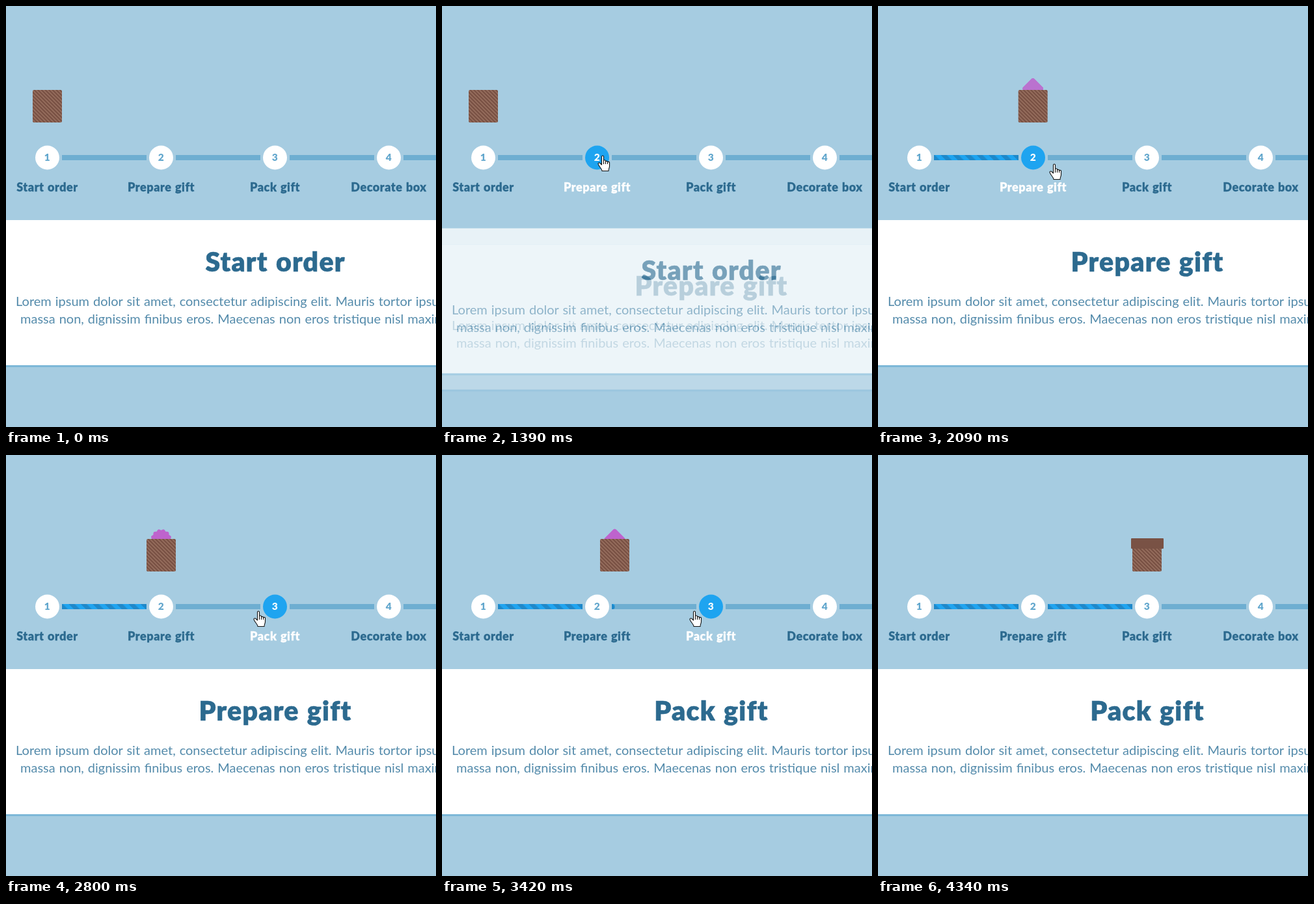
Write an HTML page that moves like this. It is 661 by 647 pixels and loops after 4.89 s.

```html
<!DOCTYPE html>
<html lang="en">
<head>
<meta charset="utf-8">
<title>Gift order steps</title>
<style>
  html, body { margin: 0; width: 100%; height: 100%; overflow: hidden; background: #a6cce1; }
  svg { display: block; width: 661px; height: 647px; }
  text { font-family: Lato, Roboto, sans-serif; }
  .bold { font-weight: 900; text-anchor: middle; letter-spacing: .03em; word-spacing: .04em; stroke-width: .015em; }
  .title { font-size: 41px; fill: #2c6a8f; stroke: #2c6a8f; }
  .label { font-size: 18px; }
  .num { font-size: 15.5px; }
  .body { font-size: 20px; fill: #548bab; word-spacing: .87px; }
</style>
</head>
<body>
<svg viewBox="0 0 661 647">
  <defs>
    <pattern id="wood" width="4" height="4" patternUnits="userSpaceOnUse" patternTransform="rotate(45)">
      <rect width="4" height="4" fill="#774f42"/><rect width="4" height="2" fill="#946c5c"/>
    </pattern>
    <pattern id="done" width="13" height="13" patternUnits="userSpaceOnUse" patternTransform="rotate(45)">
      <rect width="13" height="13" fill="#1ea4f0"/><rect y="6.5" width="13" height="6.5" fill="#1e88c9"/>
    </pattern>
  </defs>
  <g id="scene"></g>
</svg>
<script>
const LOOP = 4890, TICK = 77.6, FADE = 300, MOVE = 480;
const LABELS = ['Start order', 'Prepare gift', 'Pack gift', 'Decorate box'];
const CLICK1 = 1335, CLICK2 = CLICK1 + 22 * TICK;
const ENTER1 = 500, ENTER2 = 760, ENTER3 = 2510, LEAVE3 = 3950;
const START = { x: 443, y: 609, at: 150 };
const GLIDES = [
  { at: 150, time: 450, x: 120, y: 234 },
  { at: 680, time: 400, x: 247, y: 230 },
  { at: 1860, time: 230, x: 271, y: 243 },
  { at: 2400, time: 390, x: 388, y: 240 },
  { at: 3860, time: 400, x: 618, y: 670 },
];
const HAND = 'M-1.5 1.5C-1.5-.5 1.5-.5 1.5 1.5V8C1.5 6.4 4.5 6.4 4.5 8V9.5C4.5 8 7.5 8 7.5 9.5' +
  'V10.5C7.5 9 10.5 9 10.5 10.5V16C10.5 19 9 20 9 23.5H-1C-1 20-6.5 16-7 12.5' +
  'C-7 10.5-4.5 10.5-3.5 12L-1.5 14ZM1.5 8V13M4.5 9.5V13M7.5 10.5V13';
const ARROW = 'M0 0V16L3.7 12.5 6.1 18.1 8.3 17.2 6 11.7H11.2Z';

const stepX = i => 63.5 + 175 * i;
const mix = (a, b, k) => `color-mix(in srgb, ${b} ${(100 * k).toFixed(1)}%, ${a})`;

// cubic-bezier(.25, .1, .25, 1)
function ease(x) {
  if (x <= 0 || x >= 1) return x <= 0 ? 0 : 1;
  let lo = 0, hi = 1, s;
  for (let i = 0; i < 20; i++) {
    s = (lo + hi) / 2;
    if (.75 * s * (1 - s) + s ** 3 < x) lo = s; else hi = s;
  }
  return .3 * (1 - s) ** 2 * s + 3 * (1 - s) * s * s + s ** 3;
}
const prog = (t, start, length = FADE) => ease((t - start) / length);

function step(i, hover) {
  const x = stepX(i), ink = mix('#2c6a8f', '#fff', hover);
  return `<circle cx="${x}" cy="233" r="18.5" style="fill:${mix('#fff', '#1ea4f0', hover)}"/>
    <text class="bold num" x="${x}" y="238.4" style="fill:${mix('#62a7cd', '#fff', hover)}">${i + 1}</text>
    <text class="bold label" x="${x}" y="285" style="fill:${ink};stroke:${ink}">${LABELS[i]}</text>`;
}

function bar(i, end) {
  const w = Math.max(0, Math.min(130, end - stepX(i) - 22.5));
  const r = w < 130 ? Math.min(3, w) : 0;
  return `<g transform="translate(${stepX(i) + 22.5} 237)"><rect y="-8" width="130" height="8" fill="#6eaed1"/>
    <path fill="url(#done)" d="M0 0H${w - r}Q${w} 0 ${w} ${-r}V${r - 8}Q${w} -8 ${w - r} -8H0Z"/></g>`;
}

function panel(i, dy, alpha) {
  if (alpha <= 0) return '';
  return `<g transform="translate(0 ${dy})" opacity="${alpha}">
    <rect y="329" width="661" height="226" fill="#7db8d8"/>
    <rect y="329" width="661" height="223" fill="#fff"/>
    <text class="bold title" x="414" y="408">${LABELS[i]}</text>
    <text class="body" x="15" y="461">Lorem ipsum dolor sit amet, consectetur adipiscing elit. Mauris tortor ipsum, porta</text>
    <text class="body" x="22" y="488">massa non, dignissim finibus eros. Maecenas non eros tristique nisl maximus, vel</text></g>`;
}

function parcel(t, x) {
  const drop = prog(t, 1920), close = prog(t, 3640);
  const spread = prog(t, 2100) - prog(t, 3300, 100);
  const y = 129.7 - 20 * (1 - drop) + 24 * close;
  const gift = [-15, 15, 45].map(a =>
    `<rect x="-12" y="-12" width="24" height="24" rx="3" transform="rotate(${45 + a * spread})"/>`).join('');
  return `<g transform="translate(${x} 0)">
    <g transform="translate(0 ${y})" fill="#be63cd" opacity="${drop * (1 - close)}">${gift}</g>
    <g transform="translate(-22.5 179)"><rect y="-50" width="45" height="50" rx="2" fill="url(#wood)"/></g>
    <rect x="-24.5" y="${128 - 20 * (1 - close)}" width="50" height="16" rx="1" fill="#795245" opacity="${close}"/></g>`;
}

function pointer(t) {
  if (t < START.at - TICK / 2) return '';
  let { x, y } = START;
  for (const g of GLIDES) {
    const k = prog(t, g.at, g.time);
    x += k * (g.x - x);
    y += k * (g.y - y);
  }
  return `<path transform="translate(${x} ${y})" d="${y < 292 ? HAND : ARROW}"
    fill="#fff" stroke="#111" stroke-width="1.1" stroke-linejoin="round"/>`;
}

function draw(t) {
  const hover = [
    prog(t, ENTER1, 200) - prog(t, ENTER2),
    prog(t, ENTER2) - prog(t, ENTER3),
    prog(t, ENTER3) - prog(t, LEAVE3), 0];
  const x = stepX(prog(t, CLICK1 + FADE, MOVE) + prog(t, CLICK2 + FADE, MOVE));
  const shown = t < CLICK2 ? 0 : 1;
  const turn = prog(t, shown ? CLICK2 : CLICK1);
  return hover.map((h, i) => bar(i, x) + step(i, h)).join('') + parcel(t, x) +
    panel(shown, 50 * turn, 1 - turn) + panel(shown + 1, 50 * (1 - turn), turn) + pointer(t);
}

const scene = document.getElementById('scene');
const begin = performance.now();
let last = -1;
function frame() {
  // The picture advances in even ticks, like a screen recording
  const now = Math.max(0, performance.now() - begin) % LOOP;
  const tick = Math.floor(now / TICK + .2);
  if (tick !== last) {
    last = tick;
    scene.innerHTML = draw((tick - .1) * TICK);
  }
  requestAnimationFrame(frame);
}
frame();
</script>
</body>
</html>
```
